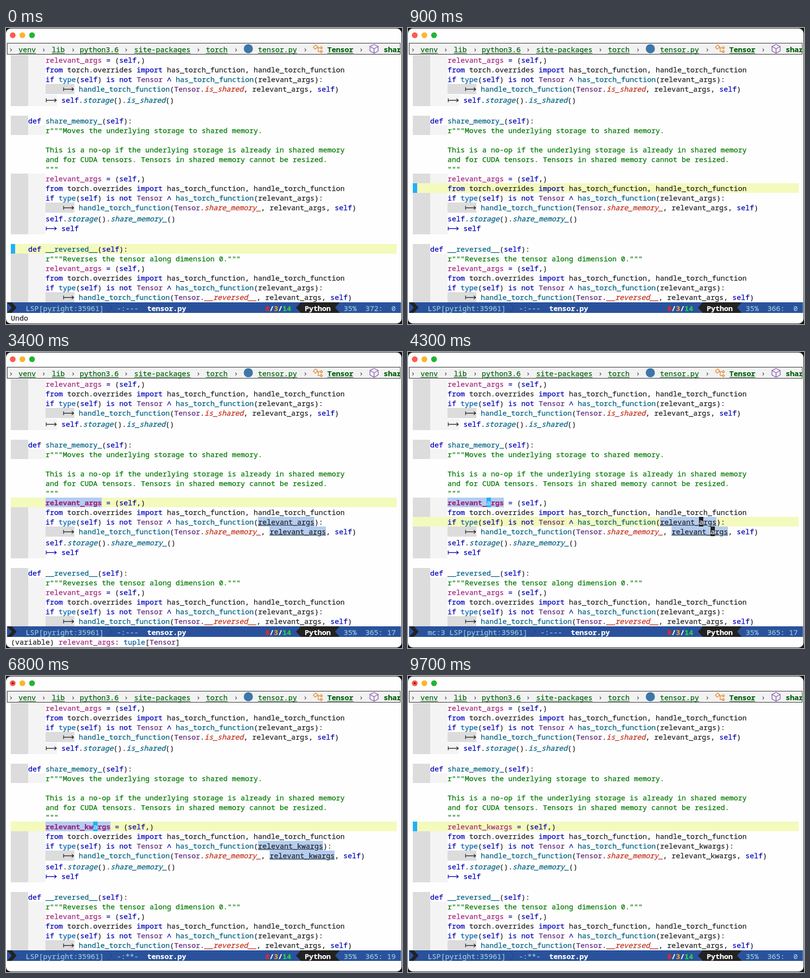
Recreate the animation shown at these times as an HTML page. Size 822 px wide and 614 px high, loop 9800 ms.

```html
<!DOCTYPE html>
<html lang="en">
<head>
<meta charset="utf-8">
<title>Editor</title>
<style>
html, body { margin: 0; width: 100%; height: 100%; overflow: hidden; background: #141414; }
#win { position: absolute; left: 0; top: 1px; width: 821px; height: 612px; border-radius: 10px; background: #fefefe; }
#stage { position: absolute; left: 0; top: 0; width: 822px; height: 614px; overflow: hidden;
  font: 500 15px/20px "Noto Sans Mono", "DejaVu Sans Mono", monospace; color: #222; white-space: pre;
  font-variant-ligatures: none; -webkit-text-stroke: .25px; }
#stage div, #stage svg { position: absolute; }
#code { left: 0; top: 0; width: 822px; height: 569px; overflow: hidden; }
#crumbs { left: 2px; top: 31px; width: 815px; height: 22px; border: 1px solid #1c1c1c; background: #f2f2f2; overflow: hidden; }
#crumbs div { top: 2px; color: #00600c; }
#crumbs .wave { text-decoration: underline wavy #d04438 1px; text-underline-offset: 3px; }
#crumbs .link { text-decoration: underline 1px; text-underline-offset: 2px; }
#crumbs .sep { color: #555; }
#mode { left: 2px; top: 569px; width: 818px; height: 22px; background: #2a529c; }
.ml { top: 571px; color: #98cadc; }
.w { color: #fff; }
.b { font-weight: 700; }
.hl { background: #f4fabc; }
.dark { background: #dcdcdc; }
.pale { background: #f4f4f4; }
.k { color: #0000b8; }
.f { color: #006080; }
.m { color: #006080; font-style: italic; }
.o { color: #c0301c; font-style: italic; }
.t { color: #5f2a78; }
.y { color: #005fa6; }
.v { color: #a3247c; }
.s { color: #007800; }
.d, .u { display: inline-block; height: 20px; vertical-align: top; background: #b4cdf0; }
.d { color: #a3247c; font-weight: 700; }
.u { text-decoration: underline; }
.cur { background: #20b0f8; color: #d8f0fc; }
.fake { background: #222; color: #fff; }
.arrow { display: inline-block; width: 24px; height: 20px; vertical-align: top; }
#stage .arrow svg { position: static; display: block; }
</style>
</head>
<body>
<div id="stage">
  <div id="win"></div>
  <svg width="822" height="30" style="left:0;top:0">
    <circle cx="14" cy="15" r="6" fill="#fc5b50"/>
    <circle cx="34" cy="15" r="6" fill="#fcb52c"/>
    <circle cx="54" cy="15" r="6" fill="#22b434"/>
    <circle id="dot" cx="14" cy="15" r="2" fill="#6e1008"/>
  </svg>
  <div id="crumbs"></div>
  <svg width="822" height="60" style="left:0;top:0" fill="none">
    <circle cx="503" cy="43" r="9.5" fill="#3d77a8"/>
    <g stroke="#ea8a2e" stroke-width="1.5">
      <path d="M638 40 643 35 647 39 642 44ZM645 41H652M648 41V49H652"/>
      <path d="M652 41 654.500 38.500 657 41 654.500 43.500ZM652 49 654.500 46.500 657 49 654.500 51.500Z"/>
    </g>
    <path d="M764 34 772.500 38.500V47.500L764 52.500 755.500 47.500V38.500ZM755.500 38.500 764 43 772.500 38.500M764 43V52.500" stroke="#8a58b4" stroke-width="1.400"/>
  </svg>
  <div id="code"></div>
  <div id="mode"></div>
  <svg width="822" height="22" viewBox="0 569 822 22" style="left:0;top:569px">
    <path d="M2 569H12L22 580 12 591H2L12 580Z" fill="#222"/>
    <path d="M602 580 612 569H693L683 580 693 591H612Z" fill="#222"/>
    <path id="chev" d="M210 569 220 580 210 591" fill="none" stroke="#223c70"/>
  </svg>
  <div id="left" class="ml" style="left:41px"></div>
  <div class="ml b" style="left:538px"><span style="color:#f02818">8</span><span class="w">/</span><span style="color:#ffa01c">3</span><span class="w">/</span><span style="color:#28d840">14</span></div>
  <div class="ml w b" style="left:620px">Python</div>
  <div class="ml" style="left:701px">35%</div>
  <div id="pos" class="ml" style="left:746px"></div>
  <div id="echo" style="left:10px;top:591px"></div>
</div>
<script>
const LOOP = 9800, CELL = 9, LEFT = 10, FIRST = 353;
const $ = id => document.getElementById(id);
const ARROW = '<span class="arrow"><svg width="24" height="20"><path d="M1.500 7V15M1.500 11H22.500M18.500 7.500 22.500 11 18.500 14.500" fill="none" stroke="currentColor" stroke-width="1.300"/></svg></span>';

// x<text> marks text with class x; → is the return arrow
const paint = s => s.replace(/([a-z])<([^>]*)>/g, '<span class="$1">$2</span>').replace(/→/g, ARROW);
const box = (cls, x, y, w, h, text = '') =>
  `<div class="${cls}" style="left:${x}px;top:${y}px;width:${w}px;height:${h}px">${text}</div>`;

const assign = n => `        ${n} k<=> (k<self>,)`;
const imports = '        k<from> torch.overrides k<import> has_torch_function, handle_torch_function';
const test = n => `        k<if> y<type>(k<self>) k<is not> t<Tensor> k<∧> f<has_torch_function>(${n}):`;
const handle = (method, n) => `            → f<handle_torch_function>(t<Tensor>.o<${method}>, ${n}, k<self>)`;
const def = name => `    k<def> f<${name}>(k<self>):`;
const ARGS = 'relevant_args', VAR = `v<${ARGS}>`;

// [text, indent style]
const listing = (bound, use) => [
  [assign(VAR), 2],
  [imports, 2],
  [test(ARGS), 2],
  [handle('is_shared', ARGS), 3],
  ['        → k<self>.m<storage>().m<is_shared>()', 4],
  ['', 0],
  [def('share_memory_'), 1],
  ['        s<r"""Moves the underlying storage to shared memory.>', 2],
  ['', 0],
  ['        s<This is a no-op if the underlying storage is already in shared memory>', 0],
  ['        s<and for CUDA tensors. Tensors in shared memory cannot be resized.>', 0],
  ['        s<""">', 0],
  [assign(bound), 2],
  [imports, 2],
  [test(use), 2],
  [handle('share_memory_', use), 3],
  ['        k<self>.m<storage>().m<share_memory_>()', 2],
  ['        k<→> k<self>', 2],
  ['', 0],
  [def('__reversed__'), 1],
  ['        s<r"""Reverses the tensor along dimension 0.""">', 2],
  [assign(VAR), 2],
  [imports, 2],
  [test(ARGS), 2],
  [handle('__reversed__', ARGS), 3]
];

function indent(kind, y, h) {
  let out = kind ? box('dark', 10, y, 36, h) : '';
  if (kind > 1) out += box('pale', 46, y, kind === 4 ? 60 : 36, h);
  if (kind === 3) out += box('dark', 82, y, 60, h - 2);
  return out;
}

function stateAt(t) {
  const up = Math.max(0, Math.min(7, Math.floor((t - 200) / 130) + 1));
  const col = t < 1500 ? 0 : t < 2500 ? 16 : t < 4500 ? 17 : t < 4700 ? 18 : t < 8600 ? 19 : 0;
  const typed = t < 4500 ? '' : t < 4700 ? 'k' : 'kw';
  const mc = t < 3900 || t >= 5700 ? 0 : t < 4100 ? 2 : 3;
  // blinking restarts at each key press
  const key = [2500, 3900, 4500, 4700, 5700].filter(k => k <= t).pop();
  const on = !key || t >= 8600 || Math.floor((t - key) / 500) % 2 === 0;
  const echo = t < 200 ? 'Undo' : t >= 3000 && t < 3900 ? `(variable) ${VAR}: y<tuple>[t<Tensor>]` : '';
  return { line: 372 - up, col, typed, mc, on, echo, sym: t >= 1900 && t < 8600 };
}

function draw({ line, col, typed, mc, on, echo, sym }) {
  const name = `relevant_${typed}args`;
  const bound = `${sym ? 'd' : 'v'}<${name}>`;
  const use = sym ? `u<${name}>` : name;
  const hlLine = mc ? 367 : line;
  const tops = {};
  let y = 56, html = '';
  listing(bound, use).forEach(([text, kind], i) => {
    const n = FIRST + i, h = text.includes('→') ? 23 : 20;
    tops[n] = y;
    html += n === hlLine ? box('hl', LEFT, y, 801, h) : indent(kind, y, h);
    html += box('', LEFT, y, 810, h, paint(text));
    y += h;
  });
  const letter = col ? name[col - 8] : '';
  if (on) html += box('cur', LEFT + col * CELL, tops[line], CELL, 20, letter);
  [[367, 523], [368, 547]].slice(0, Math.max(0, mc - 1)).forEach(([n, x]) => {
    html += box('fake', x + (col - 8) * CELL, tops[n], CELL, 20, letter);
  });
  $('code').innerHTML = html;

  $('dot').style.display = typed ? '' : 'none';
  $('left').innerHTML = `${mc ? `mc:${mc} ` : ''}LSP[pyright:35961]   -:${typed ? '**' : '--'}-  <span class="w b">tensor.py</span>`;
  $('chev').setAttribute('transform', `translate(${mc ? 45 : 0})`);
  $('pos').textContent = `${line}:${String(col).padStart(3)}`;
  $('echo').innerHTML = paint(echo);
}

const crumb = (x, text, cls, outer = '') =>
  `<div class="${outer}" style="left:${x - 3}px"><span class="${cls}">${text}</span></div>`;
$('crumbs').innerHTML =
  [6, 74, 135, 245, 395, 473, 617, 733].map(x => crumb(x, '›', 'sep')).join('') +
  [[26, 'venv'], [95, 'lib'], [153, 'python3.6'], [266, 'site-packages'], [415, 'torch'], [523, 'tensor.py']]
    .map(([x, s]) => crumb(x, s, 'link', 'wave')).join('') +
  crumb(667, 'Tensor', 'link b', 'wave') + crumb(784, 'shar', 'b');

let last = '';
function tick() {
  const state = stateAt(performance.now() % LOOP), key = JSON.stringify(state);
  if (key !== last) {
    draw(state);
    last = key;
  }
  requestAnimationFrame(tick);
}
tick();
</script>
</body>
</html>
```
